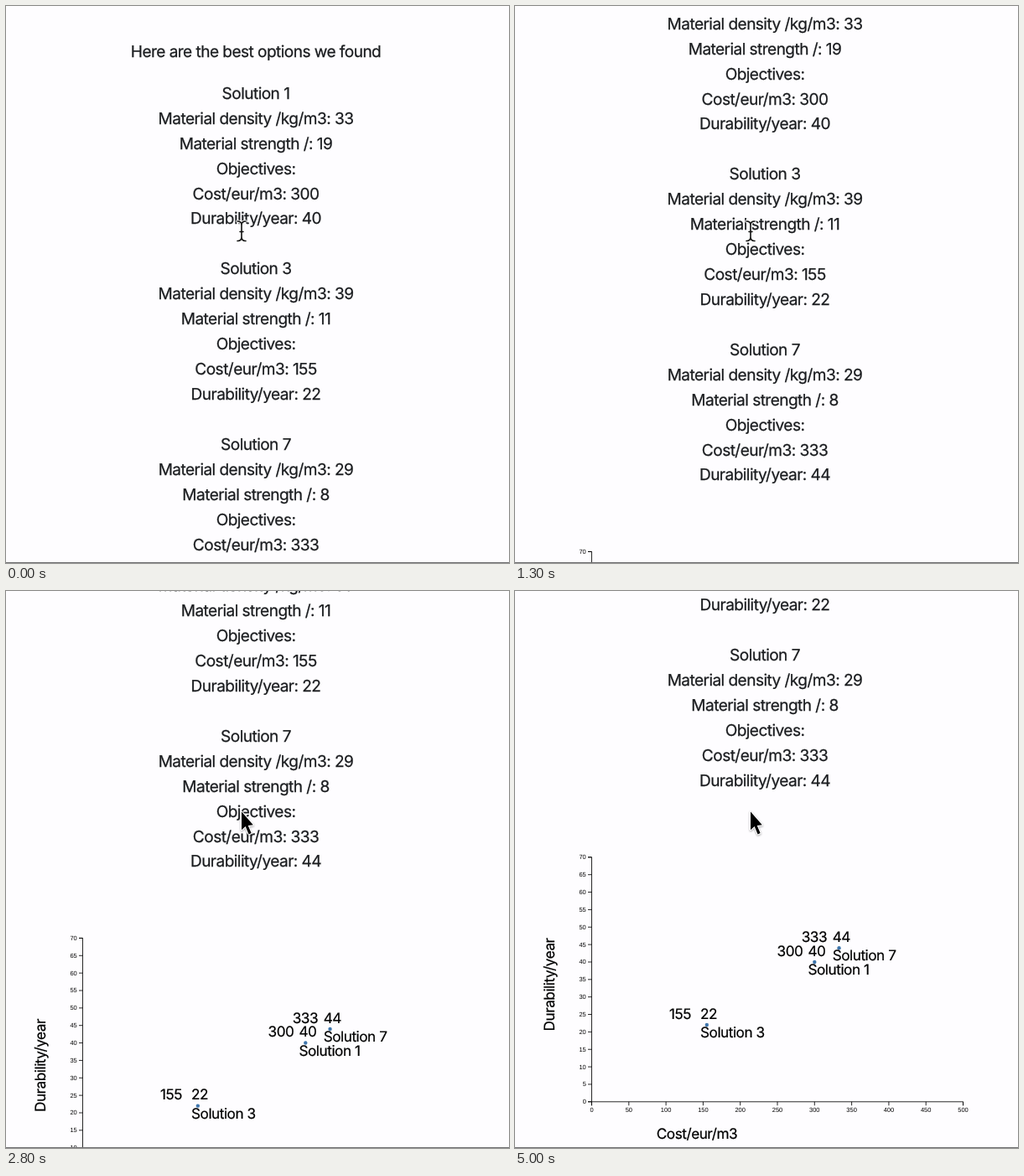
Write an HTML page that moves like this. It is 600 px wide and 665 px high and loops after 6100 ms.

```html
<!DOCTYPE html>
<html lang="en">
<head>
<meta charset="utf-8">
<title>Best options</title>
<style>
  html, body { margin: 0; width: 100%; height: 100%; overflow: hidden; background: #fefdff; }
  svg { display: block; width: 600px; height: 665px; }
  text { font-family: Inter, "Liberation Sans", sans-serif; white-space: pre; text-rendering: geometricPrecision; }
  .body { font-size: 19.1px; letter-spacing: -.56px; text-anchor: middle; fill: #1a1c1f; stroke: #1a1c1f; stroke-width: .25; }
  .label { font-size: 17.2px; letter-spacing: -.48px; fill: #000; stroke: #000; stroke-width: .22; }
  .tick { font: 7.5px "Liberation Sans", Arial, sans-serif; fill: #000; }
  .axis { fill: none; stroke: #000; stroke-width: .85; }
  #arrow { filter: drop-shadow(0 1.2px 1.2px rgba(0, 0, 0, .35)); }
</style>
</head>
<body>
<svg viewBox="0 0 600 665">
  <rect width="600" height="665" fill="#fefdff"/>
  <g id="page"></g>
  <rect y="664" width="600" height="1" fill="#707072"/>
  <g id="beam" fill="none" stroke-linecap="round">
    <path id="beamHalo" stroke="#fff" stroke-width="3.4"/>
    <path id="beamLine" stroke="#111" stroke-width="1.6"/>
  </g>
  <path id="arrow" d="M281 263.6V285.2L285.7 281L289.6 290.4L292.6 289.1L288.7 279.9L294.8 279.3Z"
    fill="#000" stroke="#fff" stroke-width="2.2" stroke-linejoin="round" paint-order="stroke"/>
</svg>
<script>
const LOOP = 6100, STEP = 100;
const SCROLL_END = 446.6;
const LINE = 29.93;
const $ = id => document.getElementById(id);
const page = $("page");

function add(parent, tag, attrs, content = "") {
  const node = document.createElementNS("http://www.w3.org/2000/svg", tag);
  for (const key in attrs) node.setAttribute(key, attrs[key]);
  node.textContent = content;
  return parent.appendChild(node);
}
const write = (parent, cls, x, y, content, extra = {}) =>
  add(parent, "text", { class: cls, x, y, ...extra }, content);

const solutions = [
  { id: 1, density: 33, strength: 19, cost: 300, years: 40 },
  { id: 3, density: 39, strength: 11, cost: 155, years: 22 },
  { id: 7, density: 29, strength: 8, cost: 333, years: 44 }
];

function drawList() {
  write(page, "body", 298, 61, "Here are the best options we found");
  solutions.forEach((s, i) => [
    `Solution ${s.id}`,
    `Material density /kg/m3: ${s.density}`,
    `Material strength /: ${s.strength}`,
    "Objectives:",
    `Cost/eur/m3: ${s.cost}`,
    `Durability/year: ${s.years}`
  ].forEach((line, j) => write(page, "body", 298, 110.8 + LINE * (i * 7 + j), line)));
}

function drawChart() {
  const chart = add(page, "g", { transform: `translate(0 ${SCROLL_END})` });
  const px = cost => 91.5 + cost * .886;
  const py = years => 609.8 - years * 4.171;
  let axes = `M87 ${py(70)}H91.5V${py(0)}H87M91.5 614.3V${py(0)}H${px(500)}V614.3`;
  for (let v = 0; v <= 70; v += 5) {
    axes += `M87 ${py(v)}h4.5`;
    write(chart, "tick", 84.8, py(v) + 2.5, v, { "text-anchor": "end" });
  }
  for (let v = 0; v <= 500; v += 50) {
    axes += `M${px(v)} ${py(0)}v4.5`;
    write(chart, "tick", px(v), 621.9, v, { "text-anchor": "middle" });
  }
  add(chart, "path", { class: "axis", d: axes });

  for (const s of solutions) {
    const x = px(s.cost), y = py(s.years);
    add(chart, "circle", { cx: x, cy: y, r: 2.2, fill: "#3f76ac" });
    write(chart, "label", x - 44.8, y - 7.3, s.cost);
    write(chart, "label", x - 7.8, y - 7.3, s.years);
    write(chart, "label", x - 7.8, y + 15.1, `Solution ${s.id}`);
  }
  write(chart, "label", 168.8, 654.2, "Cost/eur/m3");
  write(chart, "label", 0, 0, "Durability/year", { transform: "translate(47.2 525.4) rotate(-90)" });
}

// [time in ms, scroll offset]
const scrollKeys = [
  [300, 0], [500, 9], [900, 35], [1000, 44], [1100, 59], [1200, 83], [1400, 143],
  [1500, 170], [1600, 192], [1700, 207], [1800, 213], [1900, 213], [2000, 221],
  [2400, 280], [2600, 320], [2700, 337], [2800, 350], [2900, 359], [3000, 364],
  [3100, 364], [3200, 370], [3400, 393], [3600, 413], [3800, 428], [3900, 433],
  [4000, 438], [4100, 442], [4200, 445], [4300, SCROLL_END]
];

function scrollAt(t) {
  const next = scrollKeys.findIndex(key => key[0] >= t);
  if (next < 0) return SCROLL_END;
  if (next === 0) return 0;
  const [t0, a] = scrollKeys[next - 1], [t1, b] = scrollKeys[next];
  return a + (b - a) * (t - t0) / (t1 - t0);
}

function render(ms) {
  const t = Math.floor((ms % LOOP) / STEP) * STEP;
  page.setAttribute("transform", `translate(0 ${-scrollAt(t)})`);
  const pointing = (t >= 2000 && t < 3000) || t >= 4700;
  $("arrow").style.display = pointing ? "" : "none";
  $("beam").style.display = pointing ? "none" : "";
}

const beamPath = "M276 257Q281 257 281 261.5Q281 257 286 257M281 261V277" +
  "M276 280.5Q281 280.5 281 276Q281 280.5 286 280.5M279 269.5H283";
$("beamHalo").setAttribute("d", beamPath);
$("beamLine").setAttribute("d", beamPath);
drawList();
drawChart();

const start = performance.now();
function tick() {
  render(performance.now() - start);
  requestAnimationFrame(tick);
}
render(0);
requestAnimationFrame(tick);
</script>
</body>
</html>
```
